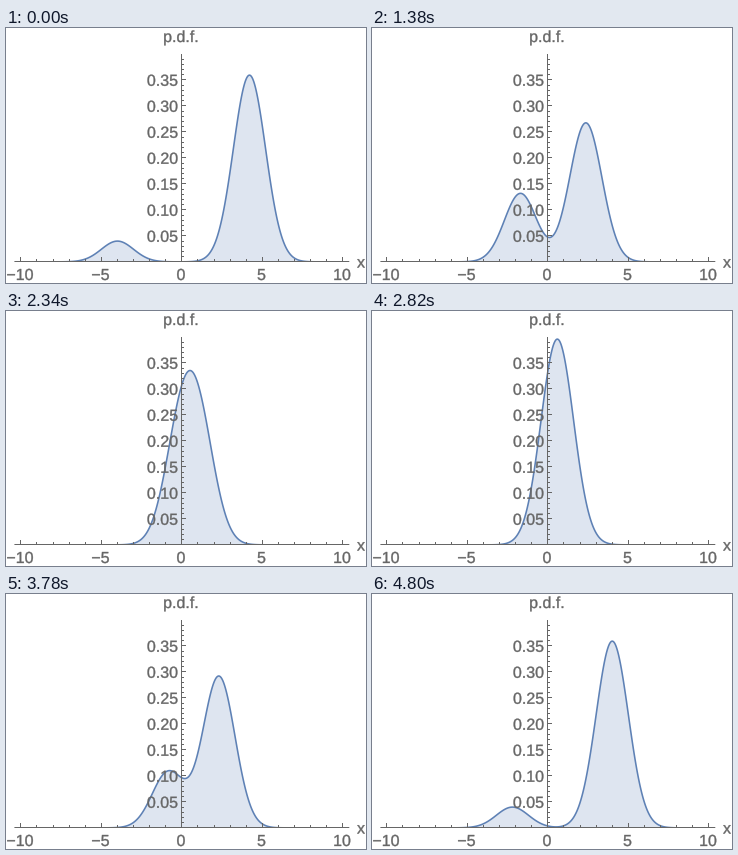
A matplotlib script that plays this animation: 360x255 px, repeating every 4.86 s.

```python
import numpy as np
import matplotlib.pyplot as plt
from matplotlib.animation import FuncAnimation
from matplotlib.patches import Polygon, Rectangle
from matplotlib.patheffects import Stroke

W, H, DPI = 360, 255, 60
FRAMES, INTERVAL = 81, 60
PT = 72 / DPI                 # points per pixel
X0, Y0 = 175.85, 233.85       # origin of the plot in pixels
SX, SY = 16.1, 520            # pixels per unit
AXIS_TOP = 26
MAJOR, MINOR = 4.5, 2.5       # tick lengths in pixels
GREY, BLUE = "#666666", "#5e81b5"

plt.rcParams["font.family"] = "Liberation Sans"
plt.rcParams["path.simplify"] = False

fig = plt.figure(figsize=(W / DPI, H / DPI), dpi=DPI, facecolor="white")
ax = fig.add_axes([0, 0, 1, 1])
ax.set_xlim(0, W)
ax.set_ylim(H, 0)
ax.axis("off")


def px(x):
    return X0 + SX * x


def py(y):
    return Y0 - SY * y


def crisp(v):
    return np.floor(v + 1e-6) + 0.5


def stroke(xs, ys):
    ax.plot(xs, ys, color=GREY, lw=PT, solid_capstyle="butt", snap=False, zorder=3)


def label(x, y, s, ha="center"):
    ax.text(x, y, s, ha=ha, va="baseline", fontsize=16 * PT, color=GREY, zorder=4,
            path_effects=[Stroke(linewidth=0.35 * PT, foreground=GREY)])


def draw_axes():
    ox, oy = crisp(X0), crisp(Y0)
    stroke([px(-10.4), px(10.4)], [oy, oy])
    stroke([ox, ox], [oy, AXIS_TOP])
    for k in range(-10, 11):
        major = k % 5 == 0
        x = crisp(px(k))
        stroke([x, x], [oy, oy - (MAJOR if major else MINOR)])
        if major:
            label(px(k) - 0.9, 252, str(k).replace("-", "\u2212"))
    for k in range(1, 40):
        major = k % 5 == 0
        y = crisp(py(k / 100))
        stroke([ox, ox + (MAJOR if major else MINOR)], [y, y])
        if major:
            label(172, y + 6.3, f"{k / 100:.2f}", ha="right")
    label(175, 14, "p.d.f.")
    label(355, 239.6, "x")


def normal(x, mean):
    return np.exp(-(x - mean) ** 2 / 2) / np.sqrt(2 * np.pi)


def mixture(x, n):
    """Two unit normals that cross while their weights swap."""
    w = 0.1 + 0.01 * n
    return w * normal(x, -4 + 0.1 * n) + (1 - w) * normal(x, 4.2 - 0.08 * n)


draw_axes()
grid = np.linspace(-10, 10, 601)
area = ax.add_patch(Polygon([[X0, Y0]] * 3, fc=BLUE, ec="none", lw=0, alpha=0.2, zorder=1))
curve, = ax.plot([], [], color=BLUE, lw=1.6 * PT, zorder=2)
curve.set_clip_path(Rectangle((0, 0), W, np.ceil(Y0), transform=ax.transData))


def update(n):
    xs, ys = px(grid), py(mixture(grid, n))
    curve.set_data(xs, ys)
    outline = np.column_stack([xs, ys])
    area.set_xy(np.vstack([[xs[0], Y0], outline, [xs[-1], Y0]]))
    return area, curve


anim = FuncAnimation(fig, update, frames=FRAMES, interval=INTERVAL,
                     repeat=True, repeat_delay=0, blit=False)
plt.show()
```
